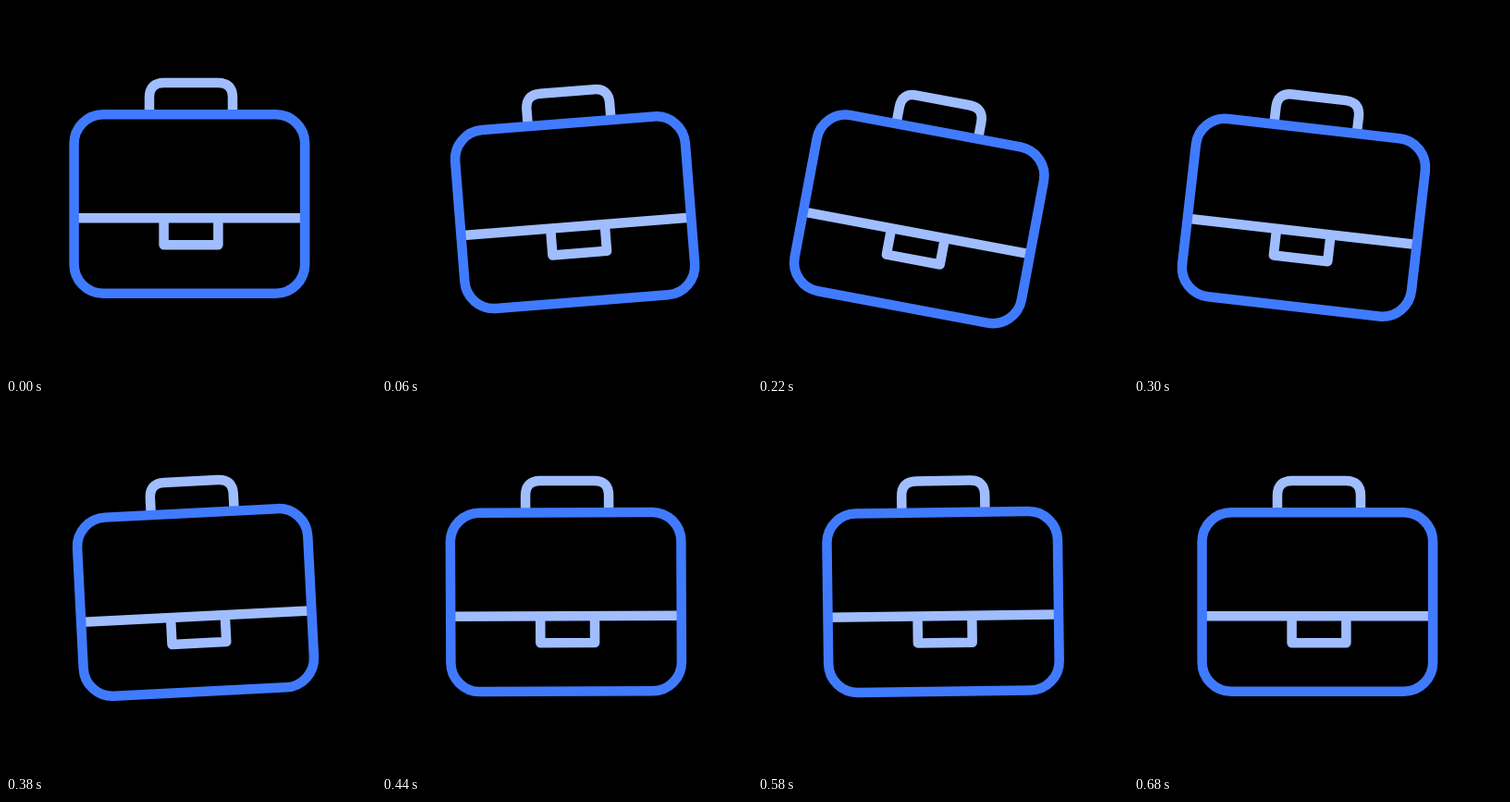
Recreate the animation shown at these times as an HTML page. Size 400x400 px, loop 700 ms.

```html
<!DOCTYPE html>
<html lang="en">
<head>
<meta charset="utf-8">
<title>Swinging briefcase</title>
<style>
  html, body { margin: 0; width: 100%; height: 100%; overflow: hidden; background: #000; }
  svg { display: block; width: 100vw; height: 100vh; }
</style>
</head>
<body>
<svg viewBox="0 0 400 400">
  <g id="bag" fill="none" stroke-width="10.5" stroke-linejoin="round">
    <g stroke="#a0bdff">
      <path d="M155 115V99Q155 83 171 83H229Q245 83 245 99V115"/>
      <path d="M76 229.2H321"/>
      <path d="M170.6 230V258.2H229.4V230"/>
    </g>
    <rect x="73.6" y="117.3" width="249.5" height="193.4" rx="31.5" stroke="#407bff"/>
  </g>
</svg>
<script>
  const LOOP = 700, STEP = 20;
  const PIVOT = { x: 200, y: 83 };

  // [time in ms, value]
  const swing = [[0, 0], [120, -9], [240, 12], [385, -2.95], [490, 2.1], [600, -1], [680, 0]];
  const drop = [[0, 0], [120, 18.9], [266, 18.9], [394, 0]];

  const bag = document.getElementById('bag');
  const ease = u => (1 - Math.cos(Math.PI * u)) / 2;

  function valueAt(keys, t) {
    const i = keys.findIndex(k => k[0] > t);
    if (i < 0) return keys[keys.length - 1][1];
    const [t0, a] = keys[i - 1], [t1, b] = keys[i];
    return a + (b - a) * ease((t - t0) / (t1 - t0));
  }

  function draw(ms) {
    const t = Math.floor((ms % LOOP + 1) / STEP) * STEP % LOOP;
    const angle = valueAt(swing, t), y = valueAt(drop, t);
    bag.setAttribute('transform',
      `translate(0 ${y.toFixed(3)}) rotate(${angle.toFixed(3)} ${PIVOT.x} ${PIVOT.y})`);
  }

  const start = performance.now();
  function tick(now) {
    draw(Math.max(0, now - start));
    requestAnimationFrame(tick);
  }
  draw(0);
  requestAnimationFrame(tick);
</script>
</body>
</html>
```
